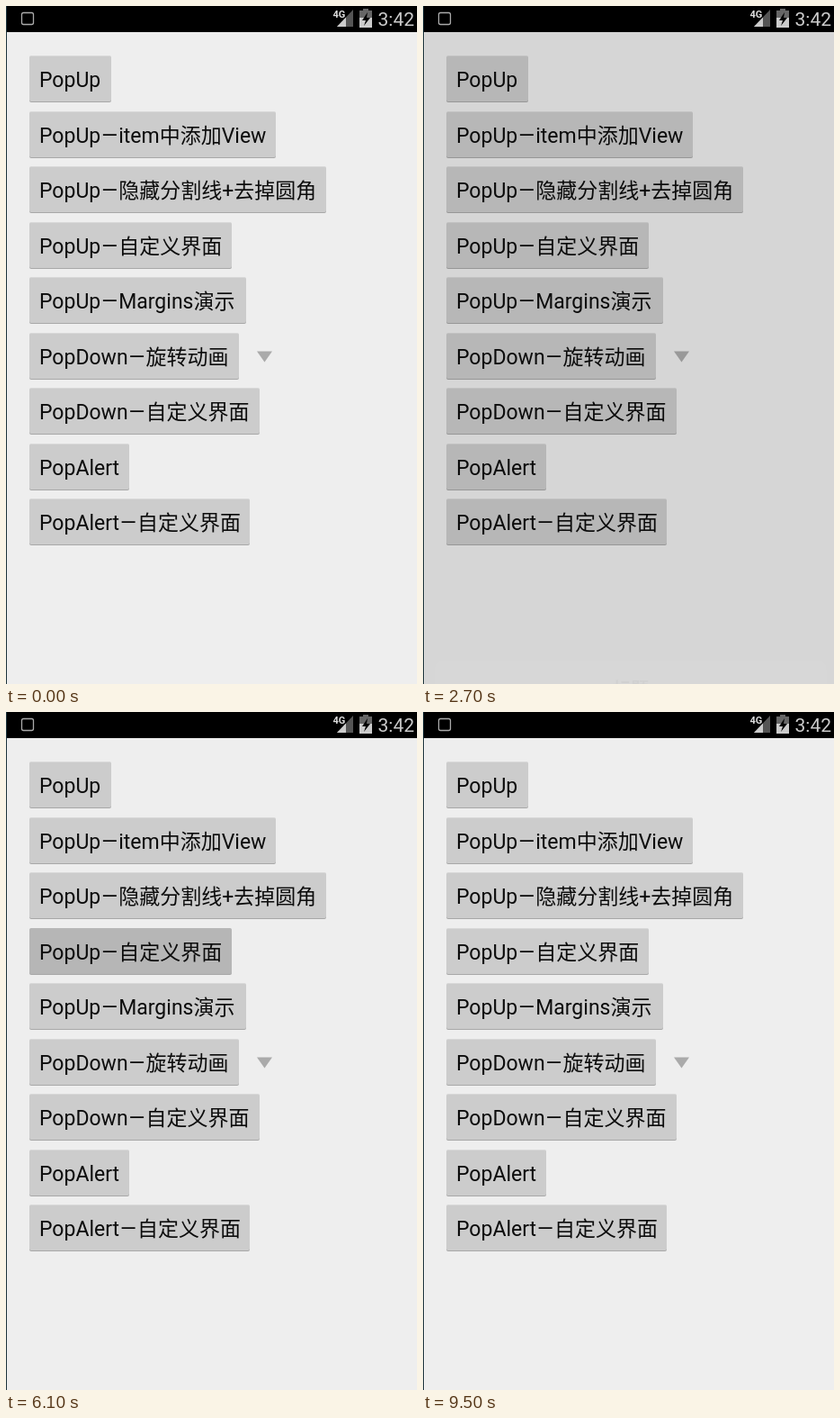
Animation of 457 by 753 pixels, one loop 9700 ms. Source, as an HTML page:

```html
<!DOCTYPE html>
<html lang="zh">
<head>
<meta charset="utf-8">
<style>
html, body { margin: 0; width: 100%; height: 100%; overflow: hidden; background: #eee; }
body { position: relative; font-family: Roboto, "Noto Sans CJK SC", "Noto Sans CJK", sans-serif; }
.btn, .sheet, #dim, #edge, svg { position: absolute; }
.btn {
  left: 26px; height: 51px; box-sizing: border-box; padding-left: 11px;
  font-size: 23px; line-height: 53px; white-space: nowrap; color: #0c0c0c;
  background: #ccc; border-radius: 2px; border-top: 1px solid #d8d8d8;
  box-shadow: 0 1px 0 #a8a8a8;
}
.btn i { font-style: normal; margin: 0 1px; }
.btn.down { background: #b6b6b6; border-color: #b6b6b6; }
#dim { left: 1px; top: 29px; right: 0; bottom: 0; background: #000; }
#edge { left: 0; top: 0; width: 1px; height: 100%; background: #1d343c; }
svg { left: 0; top: 0; }
.sheet { left: 13px; right: 8px; text-align: center; padding-bottom: 14px; }
.card { background: rgba(255,255,255,.9); border-radius: 10px; overflow: hidden; }
.card + .card { margin-top: 13px; }
.square .card { border-radius: 0; }
.card div { box-sizing: border-box; display: flex; align-items: center; justify-content: center; }
.card div + div { border-top: 1px solid #d2d2d2; }
.square .card div + div { border-color: transparent; }
.title { height: 60px; font-size: 20px; font-weight: bold; color: #444; }
.note { height: 78px; font-size: 18px; color: #8a8a8a; flex-direction: column; line-height: 28px; }
.note b { font-size: 20px; color: #777; }
.item { height: 57px; font-size: 22.5px; color: #0c74e8; }
.view { height: 129px; font-size: 18px; color: #666; background: rgba(0,0,0,.015); }
.bold { font-weight: bold; }
</style>
</head>
<body>
<svg width="457" height="29" font-family="Roboto, sans-serif">
  <rect width="457" height="29"/>
  <rect x="17.5" y="7.5" width="13" height="13" rx="2" fill="none" stroke="#aaa" stroke-width="1.3"/>
  <path d="M386 4V23H368Z" fill="#555"/>
  <path d="M378 12.500V23H368Z" fill="#ccc"/>
  <text x="363.5" y="13" font-size="11" font-weight="bold" fill="#ddd" stroke="#000" stroke-width="2" paint-order="stroke">4G</text>
  <path d="M397 3h6v2h4v19h-14v-19h4z" fill="#666"/>
  <path d="M393 13h14v11h-14z" fill="#ccc"/>
  <path d="M402 7l-6 9h4l-2 6 7-9h-4z"/>
  <text x="413.5" y="22" font-size="21" fill="#ccc">3:42</text>
</svg>
<svg width="457" height="753"><path d="M279 383.5h17l-8.5 12z" fill="#aaa"/></svg>
<div id="dim"></div>
<div id="edge"></div>
<script>
const LOOP = 9700, STEP = 100, SLIDE = 300, FADE = 255, DIM = 0.6;
const labels = [
  ['PopUp', 117], ['PopUp—item中添加View', 300], ['PopUp—隐藏分割线+去掉圆角', 356],
  ['PopUp—自定义界面', 251], ['PopUp—Margins演示', 267], ['PopDown—旋转动画', 259],
  ['PopDown—自定义界面', 282], ['PopAlert', 137], ['PopAlert—自定义界面', 271]
];
const dim = document.getElementById('dim');

const row = (kind, text) => `<div class="${kind}">${text}</div>`;
const card = (...rows) => `<div class="card">${rows.join('')}</div>`;
const item = n => row('item', '选项' + n);
const view = row('view', '自定义View');
const title = row('title', '标题');
const cancel = card(row('item bold', '取消'));
const mixed = card(title, item(1), view, item(2)) + cancel;

// press: button down; open, close: slide starts; end: dim gone
const popups = [
  { press: 600, open: 860, close: 1676, end: 2200,
    html: card(row('note', '<b>注意</b><span>你不需要选择</span>'), ...[1, 2, 3, 4].map(item)) + cancel },
  { press: 2500, open: 2660, close: 3576, end: 4100, html: mixed },
  { press: 4400, open: 4560, close: 5230, end: 5700, html: mixed, kind: 'square' },
  { press: 6100, open: 6260, close: 7076, end: 7600, html: card(view) },
  { press: 7900, open: 8060, close: 8976, end: 9500, html: card(title, item(1), item(2)) + cancel, margin: 40 }
];

function add(kind, html) {
  const el = document.createElement('div');
  el.className = kind;
  el.innerHTML = html;
  document.body.insertBefore(el, kind === 'btn' ? dim : null);
  return el;
}

const buttons = labels.map(([text, right], i) => {
  const el = add('btn', text.replace('—', '<i>—</i>'));
  el.style.top = Math.floor(55.5 + i * 61.5) + 'px';
  el.style.width = right - 26 + 'px';
  return el;
});

for (const p of popups) {
  p.el = add('sheet ' + (p.kind || ''), p.html);
  if (p.margin) Object.assign(p.el.style, { left: p.margin + 'px', right: p.margin + 'px', paddingBottom: p.margin + 'px' });
  p.height = p.el.offsetHeight;
}

const clamp = x => Math.max(0, Math.min(1, x));
const ease = x => (1 - Math.cos(Math.PI * clamp(x))) / 2;

function draw(now) {
  const t = Math.floor(now % LOOP / STEP) * STEP;
  let shade = 0;
  popups.forEach((p, i) => {
    buttons[i].classList.toggle('down', t >= p.press && t < p.open);
    const active = t >= p.open && t < p.end;
    const shown = active ? ease((t - p.open) / 240) - ease((t - p.close) / SLIDE) : 0;
    if (active) shade = DIM * clamp((t - p.open) / 240) * (1 - clamp((t - p.close - SLIDE) / FADE));
    p.el.style.visibility = shown > 0.001 ? 'visible' : 'hidden';
    p.el.style.opacity = Math.pow(Math.max(0, shown), 1.3);
    p.el.style.top = Math.round(753 - p.height * shown) + 'px';
  });
  dim.style.opacity = shade;
}

const start = performance.now();
function tick() {
  draw(performance.now() - start);
  requestAnimationFrame(tick);
}
tick();
</script>
</body>
</html>
```
